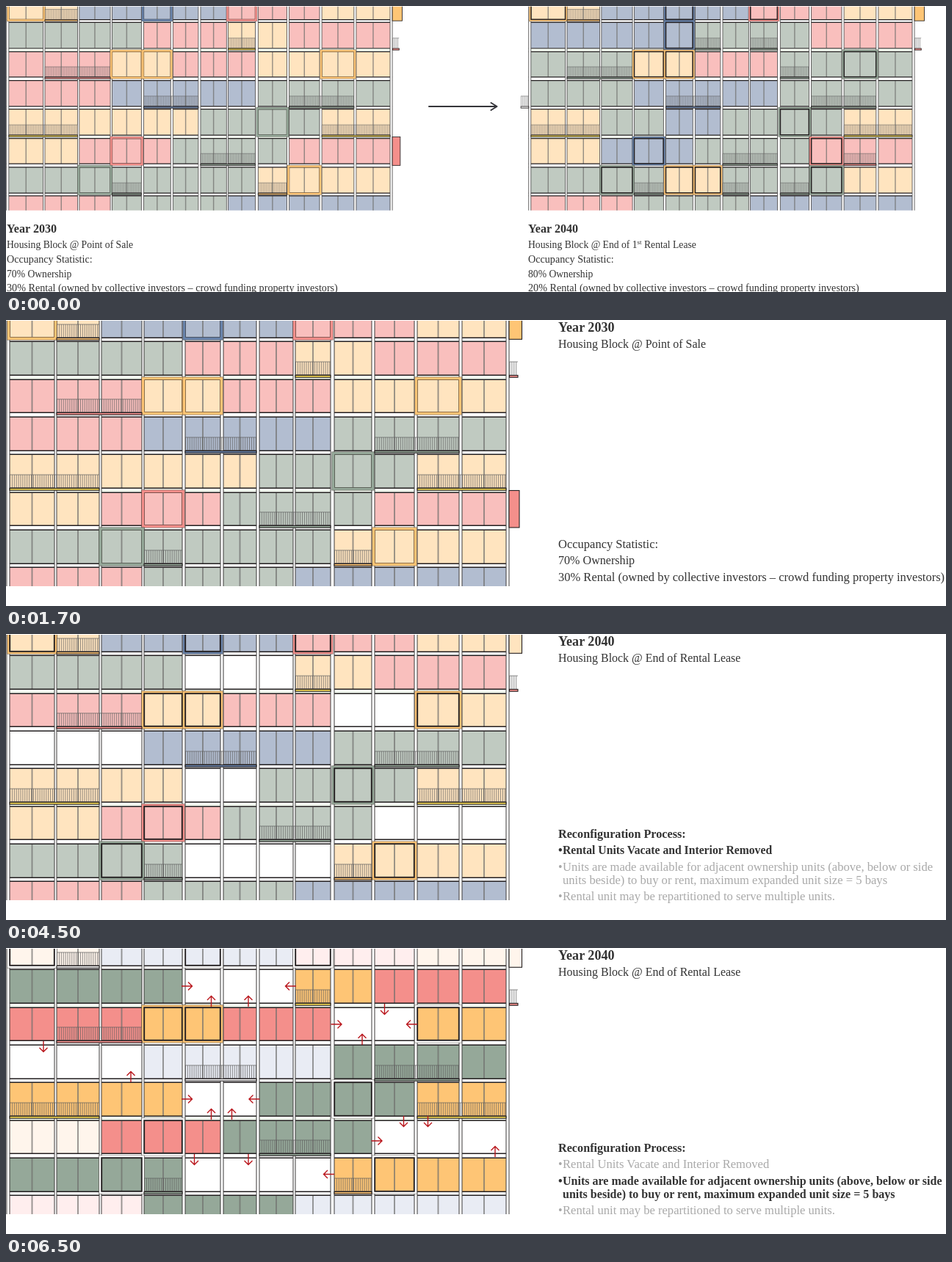
Write an HTML page that moves like this. It is 1280 px wide and 390 px high and loops after 8000 ms.

```html
<!DOCTYPE html>
<html lang="en">
<head>
<meta charset="utf-8">
<title>Housing block over time</title>
<style>
  html, body { margin: 0; width: 100%; height: 100%; overflow: hidden; background: #fff; }
  #reel { width: 1280px; animation: cut 8s step-end infinite; }
  #reel > svg { display: block; width: 1280px; height: 390px; overflow: hidden; }
  text { font-family: "Liberation Serif", "Times New Roman", serif; fill: #333; white-space: pre; }
  .bold { font-weight: 700; }
  .dim { fill: #a9a9a9; }
  @keyframes cut {
    0% { transform: translateY(0); }
    6.25% { transform: translateY(-390px); }
    31.25% { transform: translateY(-780px); }
    56.25% { transform: translateY(-1170px); }
    81.25%, 100% { transform: translateY(-1560px); }
  }
</style>
</head>
<body>
<div id="reel"></div>
<script>
const INK = '#231f20';
const LEFT = [5, 69, 130, 188, 244, 296, 345, 394, 447, 502, 560, 621];
const RIGHT = [66, 127, 185, 240, 292, 341, 391, 442, 498, 556, 617, 681];
const TOP = [-22, 29, 81, 132, 183, 235, 286, 337];
const BOTTOM = [24, 75, 126, 178, 229, 280, 332, 383];

const TONES = {
  light:  { P: '#f9bfbd', G: '#c0cac1', B: '#b2bdd0', Y: '#ffe4bf' },
  strong: { P: '#f48f8b', G: '#95a899', B: '#6883ab', Y: '#fec575' },
  faded:  { P: '#ffeeee', G: '#eef0ef', B: '#e9ecf4', Y: '#fff5ec' }
};

const before = {
  units: ['YYBBBBBPPPYY', 'GGGGPPPYYPPP', 'PPPYYPPPYYYY', 'PPPBBBBBGGGG',
          'YYYYYYGGGGYY', 'YYPPPGGGGPPP', 'GGGGGGGGYYYY', 'PPPGGGGBBBBB'],
  frames: [[0, 0], [0, 4], [0, 7], [2, 3], [2, 4], [2, 10], [4, 8], [5, 3], [6, 2], [6, 9]],
  balconies: [[0, 1, 1], [1, 7, 7], [2, 1, 2], [3, 4, 5], [3, 9, 10], [4, 0, 1],
              [4, 10, 11], [5, 6, 7], [6, 3, 3], [6, 8, 8]]
};
const after = {
  units: ['YYBBBBBPPPYY', 'BBBBBGGGGPPP', 'GGGYYPPPGGGG', 'GGGBBBBBGGGG',
          'YYGGBBGGGGYY', 'YYBBBGGGGPPP', 'GGGGYYGGGGYY', 'PPPGGGGBBBBB'],
  frames: [[0, 0], [0, 4], [0, 7], [1, 4], [2, 3], [2, 4], [2, 10], [4, 8], [5, 3],
           [5, 9], [6, 2], [6, 4], [6, 5], [6, 9]],
  balconies: [[0, 1, 1], [1, 5, 5], [1, 7, 7], [2, 1, 2], [2, 8, 8], [3, 4, 5], [3, 9, 10],
              [4, 0, 1], [4, 10, 11], [5, 6, 7], [5, 10, 10], [6, 3, 3], [6, 6, 6], [6, 8, 8]]
};

// [row, first bay, last bay]
const RENTED = [[1, 4, 6], [2, 8, 9], [3, 0, 2], [4, 4, 5], [5, 9, 11], [6, 4, 7]];
const UNAFFECTED = [[0, 0, 11], [3, 3, 7], [5, 0, 1], [7, 0, 2], [7, 7, 11]];
const within = (spans, r, c) => spans.some(([row, a, b]) => row === r && c >= a && c <= b);

const rect = (x, y, x2, y2, fill, stroke = 'none', w = 1) =>
  `<rect x="${x}" y="${y}" width="${x2 - x}" height="${y2 - y}" fill="${fill}" stroke="${stroke}" stroke-width="${w}"/>`;
const path = (d, stroke, w, more = '') =>
  `<path d="${d}" fill="none" stroke="${stroke}" stroke-width="${w}" ${more}/>`;
const text = (x, y, size, str, cls = '') =>
  `<text x="${x}" y="${y}" font-size="${size}" class="${cls}">${str}</text>`;

function fence(x1, x2, y, base) {
  let d = `M${x1} ${y - 18}H${x2}`;
  for (let x = x1 + 0.5; x <= x2; x += 2.9) d += `M${x.toFixed(1)} ${y - 18}V${y}`;
  return path(d, '#5c5c5c', 0.7) + rect(x1, y + 0.4, x2, y + 3.2, base, INK, 1.1);
}

function building(x, y, k, o) {
  const { plan, tone, trim = tone, innerLine = true } = o;
  const hue = (r, c) => plan.units[r][c];
  const trimFill = (r, c) => (trim(r, c) === 'faded' ? '#fff' : TONES.strong[hue(r, c)]);
  let s = '';

  TOP.forEach((t, r) => LEFT.forEach((l, c) => {
    const level = tone(r, c);
    if (level === 'empty') return;
    const mid = (l + RIGHT[c]) / 2;
    s += rect(l, t, RIGHT[c], BOTTOM[r], TONES[level][hue(r, c)]);
    s += path(`M${mid} ${t}V${BOTTOM[r]}`, '#6f6f6c', 1.9, 'opacity=".72"');
  }));

  for (let r = 0; r < 7; r++) {
    const a = BOTTOM[r] + 0.2, b = TOP[r + 1] + 0.2;
    s += rect(1, a, 685, b, r === 1 || r === 4 ? '#f3f9f0' : '#fff');
    s += path(`M1 ${a}H685M1 ${b}H685`, INK, 1.6);
  }
  for (let i = 0; i <= 12; i++) {
    const a = i ? RIGHT[i - 1] : 1, b = i < 12 ? LEFT[i] : 685;
    s += rect(a, -9, b, 400, '#fff', '#3c3a3a', 1);
  }

  for (const [r, c] of plan.frames) {
    const l = LEFT[c], t = TOP[r], R = RIGHT[c], b = BOTTOM[r];
    s += rect(l - 1.3, t - 1.2, R + 1.3, b + 1.2, 'none', trimFill(r, c), 4);
    s += rect(l - 3.3, t - 3.2, R + 3.3, b + 3.2, 'none', 'rgba(40,35,30,.55)', 0.7);
    s += innerLine ? rect(l + 0.2, t + 0.2, R - 0.2, b - 0.2, 'none', INK, 1.9)
                   : rect(l + 0.6, t + 0.6, R - 0.6, b - 0.6, 'none', 'rgba(40,35,30,.6)', 0.8);
  }
  for (const [r, a, b] of plan.balconies) {
    const level = tone(r, a);
    const base = level === 'faded' ? '#fff'
      : (r === 1 || r === 4) && hue(r, a) === 'Y' ? '#f5d955' : TONES.strong[hue(r, a)];
    s += fence(LEFT[a], RIGHT[b], BOTTOM[r], base);
  }

  s += rect(685, -9, 702.5, 26.3, o.topBox, INK, 1.1);
  s += fence(685.5, 697, BOTTOM[1], o.sideBase || TONES.strong.P);
  if (o.lowBox) s += rect(685, 232.5, 699, 283, TONES.strong.P, INK, 1.1);
  if (o.leftBalcony) s += fence(-13, 1, BOTTOM[3], '#fff');

  return `<svg x="${x - 14 * k}" y="${y + k}" width="${720 * k}" height="${362 * k}" viewBox="-14 1 720 362">${s}</svg>`;
}

// Arrows start at x, y and run 15px in one direction
const ANGLE = { R: 0, D: 90, L: 180, U: 270 };
const MOVES = [
  ['R', 239, 52], ['L', 395, 52], ['U', 279.5, 80], ['U', 330, 80], ['R', 442.5, 104],
  ['D', 515.5, 76], ['L', 560, 104], ['U', 485, 132], ['D', 51, 127], ['U', 170, 183],
  ['R', 239, 206], ['L', 345.5, 206], ['U', 279.5, 234], ['U', 307.5, 234], ['D', 541.5, 229],
  ['D', 574.5, 229], ['R', 497.5, 263], ['U', 666, 285], ['D', 256.5, 281], ['D', 330, 281],
  ['L', 447, 308.5]
];
const arrows = () => MOVES.map(([dir, x, y]) =>
  path('M0 0H14.5M9 -5.5L14.5 0L9 5.5', '#b9161c', 1.4,
    `transform="translate(${x} ${y}) rotate(${ANGLE[dir]})"`)).join('');

const always = level => () => level;
const heading = (year, line) => text(752, 15.5, 18.1, 'Year ' + year, 'bold') + text(752, 38, 15.95, line);
const OWNED = '(owned by collective investors – crowd funding property investors)';
const SALE = 'Housing Block @ Point of Sale';
const LEASE_END = 'Housing Block @ End of Rental Lease';

function summary(x, year, line, own, rent) {
  return text(x, 309, 16.1, 'Year ' + year, 'bold') + text(x, 329.5, 13.65, line) +
    text(x, 349.5, 14.15, 'Occupancy Statistic:') + text(x, 369.5, 13.65, own + '% Ownership') +
    text(x, 389, 14.15, `${rent}% Rental ${OWNED}`);
}

const STEPS = [
  [300, ['Rental Units Vacate and Interior Removed'], 15.7],
  [322.5, ['Units are made available for adjacent ownership units (above, below or side',
           'units beside) to buy or rent, maximum expanded unit size = 5 bays'], 16.05],
  [362.5, ['Rental unit may be repartitioned to serve multiple units.'], 16]
];
function process(active) {
  return text(752, 278, 16.2, 'Reconfiguration Process:', 'bold') +
    STEPS.map(([y, lines, boldSize], i) => {
      const cls = i === active ? 'bold' : 'dim', size = i === active ? boldSize : 16.6;
      return text(752, y, 16, '•', cls) +
        lines.map((line, n) => text(758, y + n * 18.5, size, line, cls)).join('');
    }).join('');
}

const full = { plan: before, tone: always('light'), innerLine: false, topBox: TONES.strong.Y, lowBox: true };
const vacated = (r, c) => (within(RENTED, r, c) ? 'empty' : 'light');
const offered = (r, c) => within(RENTED, r, c) ? 'empty' : within(UNAFFECTED, r, c) ? 'faded' : 'strong';

const scenes = [
  building(0, 0, 0.768, full) +
  building(711, 0, 0.768, { plan: after, tone: always('light'), topBox: TONES.strong.Y, leftBalcony: true }) +
  path('M576 137H668M660.5 132L668.5 137L660.5 142', '#35353a', 2, 'stroke-linecap="round" stroke-linejoin="round"') +
  summary(1, 2030, SALE, 70, 30) +
  summary(711, 2040, 'Housing Block @ End of 1<tspan font-size="9" dy="-4.5">st</tspan><tspan dy="4.5"> Rental Lease</tspan>', 80, 20),

  building(0, 0, 1, full) + heading(2030, SALE) +
  text(752, 310.5, 16.5, 'Occupancy Statistic:') + text(752, 333, 16.1, '70% Ownership') +
  text(752, 355.5, 16.5, '30% Rental ' + OWNED),

  building(0, 0, 1, {
    plan: before, tone: (r, c) => (within(RENTED, r, c) ? 'strong' : 'faded'),
    topBox: TONES.faded.Y, sideBase: '#fff', lowBox: true
  }) + heading(2030, SALE) +
  text(752, 310.5, 16.5, 'Occupancy Statistic:', 'dim') + text(752, 333, 16.1, '70% Ownership', 'dim') +
  text(752, 355.5, 15.1, '30% Rental', 'bold') + text(831.5, 355.5, 16.6, OWNED),

  building(0, 0, 1, { plan: before, tone: vacated, topBox: TONES.light.Y }) +
  heading(2040, LEASE_END) + process(0),

  building(0, 0, 1, {
    plan: before, tone: offered, topBox: TONES.faded.Y,
    trim: (r, c) => (r === 2 && c < 5 ? 'strong' : 'faded')
  }) + arrows() + heading(2040, LEASE_END) + process(1)
];

document.getElementById('reel').innerHTML =
  scenes.map(s => `<svg viewBox="0 0 1280 390">${s}</svg>`).join('');
</script>
</body>
</html>
```
